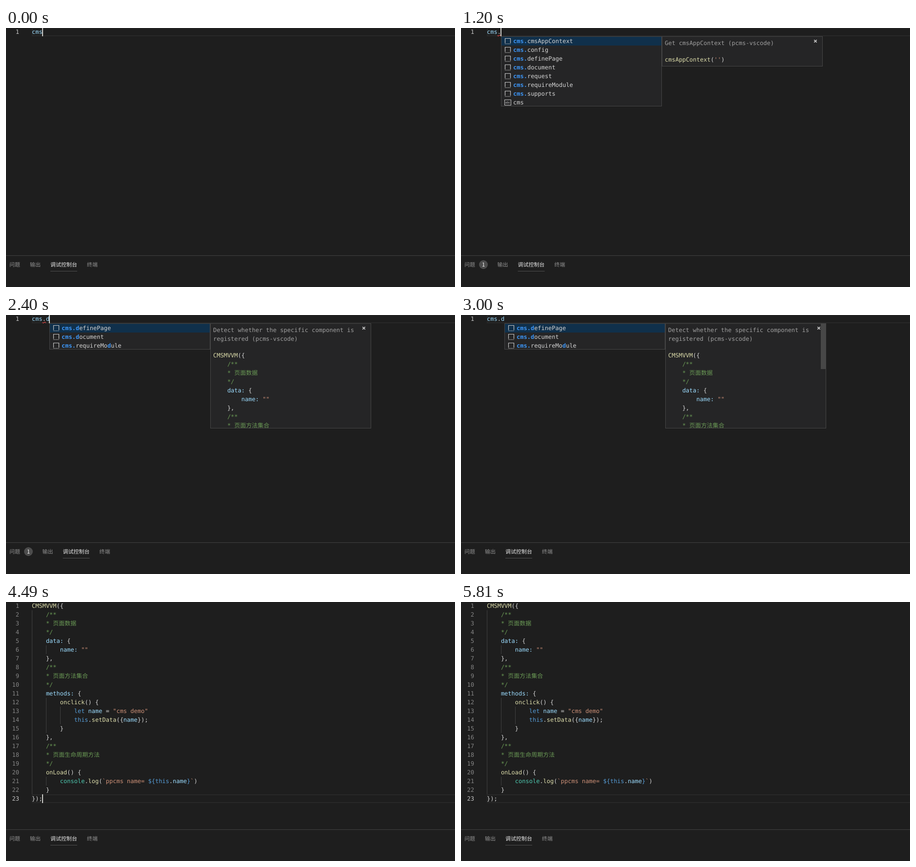
These frames come from a looping animation (921x532 px, 5.88 s). An HTML page:

```html
<!DOCTYPE html>
<html lang="zh-CN">
<head>
<meta charset="utf-8">
<title>Snippet completion</title>
<style>
  html, body { margin: 0; width: 100%; height: 100%; overflow: hidden; background: #1e1e1e; }
  svg { display: block; }
  text { font: 12px "DejaVu Sans Mono", "Noto Sans CJK SC", monospace; white-space: pre; text-rendering: geometricPrecision; }
  .tab { font: 11px "Noto Sans CJK SC", "Noto Sans", sans-serif; }
</style>
</head>
<body>
<svg id="stage" width="921" height="532" viewBox="0 0 921 532"></svg>
<script>
const LOOP = 5880, ROW = 18, LEFT = 53;
const COLORS = {
  w: '#d4d4d4', y: '#dcdcaa', g: '#6a9955', b: '#9cdcfe', k: '#569cd6',
  s: '#ce9178', t: '#4ec9b0', a: '#a0a0a0', m: '#3d96f7',
};

// Each run of text starts with "|" and a colour key.
const CODE = [
  '|yCMSMVVM|w({',
  '|g    /**',
  '|g    * 页面数据',
  '|g    */',
  '|b    data:|w {',
  '|b        name:|s ""',
  '|w    },',
  '|g    /**',
  '|g    * 页面方法集合',
  '|g    */',
  '|b    methods:|w {',
  '|y        onclick|w() {',
  '|k            let |bname|w = |s"cms demo"',
  '|k            this|w.|ysetData|w({|bname|w});',
  '|w        }',
  '|w    },',
  '|g    /**',
  '|g    * 页面生命周期方法',
  '|g    */',
  '|y    onLoad|w() {',
  '|t        console|w.|ylog|w(|s`ppcms name= |k${this|w.|bname|k}|s`|w)',
  '|w    }',
  '|w});',
];

const rect = (x, y, w, h, fill, extra = '') =>
  `<rect x="${x}" y="${y}" width="${w}" height="${h}" fill="${fill}" ${extra}/>`;
const path = (d, stroke, width = 1, extra = '') =>
  `<path d="${d}" fill="none" stroke="${stroke}" stroke-width="${width}" ${extra}/>`;
const text = (x, y, content, fill, extra = '') =>
  `<text x="${x}" y="${y}" fill="${fill}" ${extra}>${content}</text>`;
const group = (id, content, x = 0, y = 0) =>
  `<g id="${id}" transform="translate(${x} ${y})">${content}</g>`;

const rich = (x, y, line) => text(x, y, line.split('|').slice(1).map(run =>
  `<tspan fill="${COLORS[run[0]]}"${run[0] === 'm' ? ' font-weight="bold"' : ''}>${run.slice(1)}</tspan>`
).join(''), COLORS.w);
const lines = (x, y, list) => list.map((line, i) => rich(x, y + i * ROW, line)).join('');

const box = (x, y, w, h) =>
  rect(x + .5, y + .5, w - 1, h - 1, '#252526', 'stroke="#454545"');
const lineNumber = (n, active) =>
  text(27, 12 + (n - 1) * ROW, n, active ? '#c6c6c6' : '#858585', 'text-anchor="end"');
const currentLine = n =>
  rect(LEFT + 1, (n - 1) * ROW, 900, 16, 'none', 'stroke="#282828" stroke-width="2"');
const guide = (x, first, last) =>
  rect(x, first * ROW - 19, 1, (last - first + 1) * ROW, '#404040');

const snippetIcon = y =>
  path(`M8.5 ${y + 14}V${y + 4.5}H19.5V${y + 14}`, '#c5c5c5', 1.2) +
  path(`M8 ${y + 15.5}H20.5`, '#c5c5c5', 1.2, 'stroke-dasharray="1.5 1"');
const wordIcon = y =>
  rect(7.5, y + 4.5, 13, 11, 'none', 'stroke="#c5c5c5"') +
  text(14, y + 12, 'abc', '#c5c5c5', 'text-anchor="middle" style="font-size:6px"');

// Completion list with its documentation pane, relative to the list corner.
function suggest(id, x, items, docHeight, doc, scrollbar = '') {
  const rows = items.map((item, i) =>
    (item === '|wcms' ? wordIcon : snippetIcon)(i * ROW) + rich(25, 14 + i * ROW, item));
  const clip = id + 'Clip';
  return group(id,
    box(0, 0, 330, items.length * ROW + (items.length < 8 ? 0 : 0)) +
    rect(1, 1, 328, ROW, '#10304b') + rows.join('') +
    box(330, 0, 330, docHeight) +
    `<clipPath id="${clip}">${rect(331, 1, 328, docHeight - 2, '#000')}</clipPath>` +
    `<g clip-path="url(#${clip})">${doc}</g>` +
    path('M642.3 7.3l5.4 5.4m0-5.4l-5.4 5.4', '#c5c5c5', 1.7) + scrollbar,
    x, 17);
}

const tabs = shift => [['输出', 49], ['调试控制台', 91], ['终端', 166]].map(([name, x], i) =>
  text(x + shift, 490, name, i === 1 ? '#e7e7e7' : '#919191', 'class="tab"')).join('') +
  rect(91 + shift, 499, 55, 1, '#505050');

const stage = document.getElementById('stage');
stage.innerHTML =
  rect(0, 0, 921, 532, '#1e1e1e') +
  group('typing', currentLine(1) + lineNumber(1, true) + rich(LEFT, 12, '|bcms') +
    group('dot', rich(LEFT + 21.67, 12, '|w.')) +
    group('letter', rich(LEFT + 28.9, 12, '|bd'))) +
  group('squiggle', path('M0 1.2L1.8 2.6L4.8 .4L7.2 2.4', '#f14c4c', 1.1), 74.7, 14) +
  group('program', currentLine(23) +
    guide(53, 2, 22) + guide(82, 6, 6) + guide(82, 12, 15) + guide(82, 21, 21) + guide(111, 13, 14) +
    CODE.map((_, i) => lineNumber(i + 1, i === 22)).join('') + lines(LEFT, 12, CODE)) +
  group('caret', rect(0, -1, 2, ROW, '#d0d0cc')) +
  suggest('allItems', 82,
    ['cmsAppContext', 'config', 'definePage', 'document', 'request', 'requireModule', 'supports']
      .map(name => '|mcms.|w' + name).concat('|wcms'),
    62, lines(336, 18, ['|aGet cmsAppContext (pcms-vscode)']) +
    rich(336, 52, "|ycmsAppContext|w(|s''|w)")) +
  suggest('filteredItems', 89,
    ['|mcms.d|wefinePage', '|mcms.d|wocument', '|mcms.|wrequireMo|md|wule'],
    216, lines(336, 18, ['|aDetect whether the specific component is', '|aregistered (pcms-vscode)']) +
    lines(336, 70, CODE.slice(0, 9)),
    group('scrollbar', rect(649, 1, 10, 93, '#474747'))) +
  rect(0, 467, 921, 1, '#414141') +
  text(7, 490, '问题', '#919191', 'class="tab"') +
  group('plainTabs', tabs(0)) +
  group('badgeTabs', tabs(25.6) + rect(37, 477, 18, 18, '#4d4d4d', 'rx="9"') +
    text(46, 490, '1', '#fff', 'class="tab" text-anchor="middle"')) +
  group('pointer', '<path d="M.5 1V14.6L3.7 11.7L5.8 16.4L8 15.5L6 11H10.3Z" fill="#000" stroke="#fff"/>');

const part = id => document.getElementById(id);
const show = (id, visible) => part(id).setAttribute('display', visible ? 'inline' : 'none');
const move = (id, x, y) => part(id).setAttribute('transform', `translate(${x} ${y})`);
const CARET_OFF = [[750, 1200], [1800, 2250], [3000, 3440], [4040, 4490], [4940, 5530], [5810, LOOP]];

function draw(t) {
  const during = (from, to) => t >= from && t < to;
  const problem = during(600, 2850);
  show('typing', t < 3440);
  show('dot', t >= 300);
  show('letter', t >= 2400);
  show('allItems', during(300, 2400));
  show('filteredItems', during(2400, 3440));
  show('scrollbar', t >= 2550);
  show('squiggle', problem);
  show('badgeTabs', problem);
  show('plainTabs', !problem);
  show('program', t >= 3440);

  show('caret', !CARET_OFF.some(([from, to]) => during(from, to)));
  const caretX = during(300, 2400) ? 81 : during(2400, 3440) ? 88 : 74;
  move('caret', caretX, t < 3440 ? 0 : 396);

  show('pointer', during(4790, 5240));
  move('pointer', ...(t < 4940 ? [867, 505] : t < 5090 ? [851, 515] : [854, 514]));
}

const start = performance.now();
function tick() {
  draw((performance.now() - start) % LOOP);
  requestAnimationFrame(tick);
}
tick();
</script>
</body>
</html>
```
